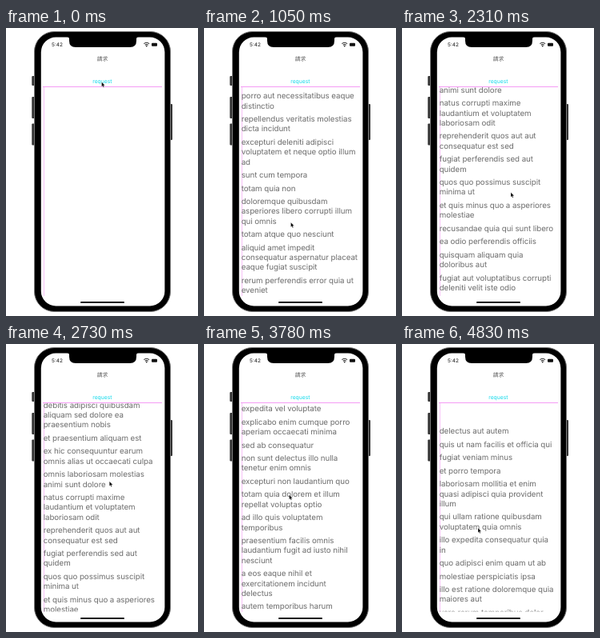
Recreate the animation shown at these times as an HTML page. Size 240x360 px, loop 5040 ms.

```html
<!DOCTYPE html>
<html lang="en">
<head>
<meta charset="utf-8">
<title>Request list</title>
<style>
html, body { margin: 0; width: 100%; height: 100%; overflow: hidden; background: #fff; }
svg { display: block; width: 100vw; height: 100vh; }
text { font-family: Inter, "Liberation Sans", sans-serif; text-rendering: geometricPrecision; white-space: pre; }
#list text { font-size: 9.75px; letter-spacing: -.06px; fill: #6c6c6c; }
</style>
</head>
<body>
<svg viewBox="0 0 240 360">
  <defs>
    <clipPath id="window"><rect x="44" y="74" width="154" height="260.5"/></clipPath>
  </defs>
  <g fill="#333">
    <rect x="32.3" y="60" width="4" height="12" rx="1"/>
    <rect x="32.3" y="86" width="4" height="27" rx="1"/>
    <rect x="32.3" y="119.5" width="4" height="27" rx="1"/>
    <rect x="204" y="95" width="4" height="45" rx="1"/>
  </g>
  <rect x="35.5" y="4.5" width="170" height="350" rx="25" stroke="#777"/>
  <rect x="43.8" y="11.5" width="154.6" height="336" rx="18.5" fill="#fff"/>
  <path d="M76 11H166Q163 11 163 14V16Q163 24 155 24H87Q79 24 79 16V14Q79 11 76 11Z"/>
  <text x="57" y="23" font-size="6.4" font-weight="500" fill="#333">5:42</text>
  <g fill="none" stroke="#222" stroke-width="1.1">
    <path d="M172.4 19.6Q175.7 16.8 179 19.6M173.8 21.3Q175.7 19.8 177.6 21.3"/>
    <circle cx="175.7" cy="22.6" r=".4"/>
  </g>
  <rect x="182" y="18.8" width="7" height="4" rx="1" fill="#111"/>
  <text x="120.5" y="41" font-size="6.8" text-anchor="middle" fill="#555" style="font-family:'Noto Sans CJK TC','Noto Sans CJK JP','Noto Sans CJK',sans-serif">請求</text>
  <text x="120.4" y="69" font-size="6.8" text-anchor="middle" fill="#10d8ea">request</text>
  <path d="M47.5 74V335" stroke="#f8c4f8"/>
  <g clip-path="url(#window)"><g id="list"></g></g>
  <path d="M46 73.5H195" stroke="#f59cf5"/>
  <rect x="93" y="342" width="55" height="1.8" rx=".9"/>
  <path id="cursor" d="M0 0V5.8L1.3 4.7 2.2 6.7 3.2 6.3 2.3 4.3H4.2Z" stroke="#fff" stroke-width=".3"/>
</svg>
<script>
const TITLES = `delectus aut autem
quis ut nam facilis et officia qui
fugiat veniam minus
et porro tempora
laboriosam mollitia et enim quasi adipisci quia provident illum
qui ullam ratione quibusdam voluptatem quia omnis
illo expedita consequatur quia/in
quo adipisci enim quam ut ab
molestiae perspiciatis ipsa
illo est ratione doloremque quia maiores aut
vero rerum temporibus dolor
ipsa repellendus fugit nisi
et doloremque nulla
repellendus sunt dolores architecto voluptatum
ab voluptatum amet voluptas
accusamus eos facilis sint et aut voluptatem
quo laboriosam deleniti aut qui
dolorum est consequatur ea mollitia in culpa
molestiae ipsa aut voluptatibus pariatur dolor nihil
ullam nobis libero sapiente ad optio sint
suscipit repellat esse quibusdam voluptatem incidunt
distinctio vitae autem nihil ut molestias quo
et itaque necessitatibus maxime molestiae qui quas velit
adipisci non ad dicta qui amet quaerat doloribus ea
voluptas quo tenetur perspiciatis explicabo natus
aliquam aut quasi
veritatis pariatur delectus
nesciunt totam sit blanditiis sit
laborum aut in quam
nemo perspiciatis repellat ut dolor libero commodi blanditiis omnis
repudiandae totam in est sint facere fuga
earum doloribus ea doloremque quis
sint sit aut vero
porro aut necessitatibus eaque distinctio
repellendus veritatis molestias dicta incidunt
excepturi deleniti adipisci voluptatem et neque optio illum ad
sunt cum tempora
totam quia non
doloremque quibusdam asperiores libero corrupti illum qui omnis
totam atque quo nesciunt
aliquid amet impedit consequatur aspernatur placeat eaque fugiat suscipit
rerum perferendis error quia ut eveniet
tempore ut sint quis recusandae
cum debitis quis accusamus doloremque ipsa natus sapiente omnis
velit soluta adipisci molestias reiciendis harum
vel voluptatem repellat nihil placeat corporis
nam qui rerum fugiat accusamus
sit reprehenderit omnis quia
ut necessitatibus aut maiores debitis officia blanditiis velit et
cupiditate necessitatibus ullam aut quis dolor voluptate
distinctio exercitationem ab doloribus
nesciunt dolorum quis recusandae ad pariatur ratione
qui labore est occaecati recusandae aliquid quam
quis et est ut voluptate quam dolor
voluptatum omnis minima qui occaecati provident nulla voluptatem ratione
deleniti ea temporibus enim
pariatur et magnam ea doloribus similique voluptatem rerum quia
est dicta totam qui explicabo doloribus qui dignissimos
perspiciatis velit id laborum placeat iusto et aliquam odio
et sequi qui architecto ut adipisci
odit optio omnis qui sunt
et placeat et tempore aspernatur sint numquam
doloremque aut dolores quidem fuga qui nulla
voluptas consequatur qui ut quia magnam nemo esse
fugiat pariatur ratione ut asperiores necessitatibus magni
rerum eum molestias autem voluptatum sit optio
quia voluptatibus voluptatem quos similique maiores repellat
aut id perspiciatis voluptatem iusto
doloribus sint dolorum ab adipisci itaque dignissimos aliquam suscipit
ut sequi accusantium et mollitia delectus sunt
aut velit saepe ullam
praesentium facilis facere quis harum voluptatibus voluptatem eum
sint amet quia totam corporis qui exercitationem commodi
expedita tempore nobis eveniet laborum maiores
occaecati adipisci est possimus totam
sequi dolorem sed
maiores aut nesciunt delectus exercitationem vel assumenda eligendi at
reiciendis est magnam amet nemo iste recusandae impedit quaerat
eum ipsa maxime ut
tempore molestias dolores rerum sequi voluptates ipsum consequatur
suscipit qui totam
voluptates eum voluptas et dicta
quidem at rerum quis ex aut sit quam
sunt veritatis ut voluptate
et quia ad iste a
incidunt ut saepe autem
laudantium quae eligendi consequatur quia et vero autem
vitae aut excepturi laboriosam sint aliquam et et accusantium
sequi ut omnis et
molestiae nisi accusantium tenetur dolorem et
nulla quis consequatur saepe qui id expedita
in omnis laboriosam
odio iure consequatur molestiae quibusdam necessitatibus quia sint
facilis modi saepe mollitia
vel nihil et molestiae iusto assumenda nemo quo ut
nobis suscipit ducimus enim asperiores voluptas
dolorum laboriosam eos qui iure aliquam
debitis accusantium ut quo facilis nihil quis sapiente necessitatibus
neque voluptates ratione
excepturi a et neque qui/expedita vel voluptate
explicabo enim cumque porro aperiam occaecati minima
sed ab consequatur
non sunt delectus illo nulla tenetur enim omnis
excepturi non laudantium quo
totam quia dolorem et illum repellat voluptas optio
ad illo quis voluptatem temporibus
praesentium facilis omnis laudantium fugit ad iusto nihil nesciunt
a eos eaque nihil et exercitationem incidunt delectus
autem temporibus harum quisquam in culpa
aut aut ea corporis
magni accusantium labore et id quis provident
consectetur impedit quisquam qui deserunt non rerum consequuntur eius
quia atque aliquam sunt impedit voluptatum rerum assumenda nisi
cupiditate quos possimus corporis quisquam exercitationem beatae
sed et ea eum
ipsa dolores vel facilis ut
sequi quae est et qui qui eveniet asperiores
quia modi consequatur vero fugiat
corporis ducimus ea perspiciatis iste
dolorem laboriosam vel voluptas et aliquam quasi
inventore aut nihil minima laudantium hic qui omnis
provident aut nobis culpa
esse et quis iste est earum aut impedit
qui consectetur id
aut quasi autem iste tempore illum possimus
ut asperiores perspiciatis veniam ipsum rerum saepe
voluptatem libero consectetur rerum ut
eius omnis est qui voluptatem autem
rerum culpa quis harum
nulla aliquid eveniet harum laborum libero alias ut unde
qui ea incidunt quis
qui molestiae voluptatibus velit iure harum quisquam
et labore eos enim rerum consequatur sunt
molestiae doloribus et laborum quod ea
facere ipsa nam eum voluptates reiciendis vero qui
asperiores illo tempora fuga sed ut quasi adipisci
qui sit non
placeat minima consequatur rem qui ut
consequatur doloribus id possimus voluptas a voluptatem
aut consectetur in blanditiis deserunt quia sed laboriosam
explicabo consectetur debitis voluptates quas quae culpa rerum non
maiores accusantium architecto necessitatibus reiciendis ea aut
eum non recusandae cupiditate animi
ut eum exercitationem sint
beatae qui ullam incidunt voluptatem non nisi aliquam
molestiae suscipit ratione nihil odio libero impedit vero totam
eum itaque quod reprehenderit et facilis dolor autem ut
esse quas et quo quasi exercitationem
animi voluptas quod perferendis est
eos amet tempore laudantium fugit a
accusamus adipisci dicta qui quo ea explicabo sed vero
odit eligendi recusandae doloremque cumque non
ea aperiam consequatur qui repellat eos
rerum non ex sapiente
voluptatem nobis consequatur et assumenda magnam
nam quia quia nulla repellat assumenda quibusdam sit/nobis
dolorem veniam quisquam deserunt repellendus
debitis vitae delectus et harum accusamus aut deleniti a
debitis adipisci quibusdam aliquam sed dolore ea praesentium nobis
et praesentium aliquam est
ex hic consequuntur earum omnis alias ut occaecati culpa
omnis laboriosam molestias animi sunt dolore
natus corrupti maxime laudantium et voluptatem laboriosam odit
reprehenderit quos aut aut consequatur est sed
fugiat perferendis sed aut quidem
quos quo possimus suscipit minima ut
et quis minus quo a asperiores molestiae
recusandae quia qui sunt libero
ea odio perferendis officiis
quisquam aliquam quia doloribus aut
fugiat aut voluptatibus corrupti deleniti velit iste odio
et provident amet rerum consectetur et voluptatum
harum ad aperiam quis
similique aut quo
laudantium eius officia perferendis provident perspiciatis asperiores
magni soluta corrupti ut maiores rem quidem
et placeat temporibus voluptas est tempora quos quibusdam
nesciunt itaque commodi tempore
omnis consequuntur cupiditate impedit itaque ipsam quo
debitis nisi et dolorem repellat et
ut cupiditate sequi aliquam fuga maiores
inventore saepe cumque et aut illum enim
omnis nulla eum aliquam distinctio
molestias modi perferendis perspiciatis`.split("\n");

const LOOP = 5040, STEP = 210, LINE = 12.33, GAP = 4.17;
const list = document.getElementById("list");
const cursor = document.getElementById("cursor");

function addText(content, y) {
  const node = document.createElementNS("http://www.w3.org/2000/svg", "text");
  node.setAttribute("x", 46.7);
  node.setAttribute("y", y);
  node.textContent = content;
  return list.appendChild(node);
}

const ruler = addText("", 0);
function widthOf(content) {
  ruler.textContent = content;
  return ruler.getComputedTextLength();
}

// The widest line that still fits sets the column width.
const maxWidth = widthOf("consequatur aspernatur placeat") + 0.2;

// A slash in a title forces a line break.
function wrap(title) {
  const lines = [];
  for (const part of title.split("/")) {
    let line = "";
    for (const word of part.split(" ")) {
      const longer = line ? line + " " + word : word;
      if (line && widthOf(longer) > maxWidth) {
        lines.push(line);
        line = word;
      } else line = longer;
    }
    lines.push(line);
  }
  return lines;
}

const rowTops = [];
let bottom = 0;
for (const lines of TITLES.map(wrap)) {
  rowTops.push(bottom);
  lines.forEach((line, i) => addText(line, bottom + i * LINE + 3.3));
  bottom += lines.length * LINE + GAP;
}
ruler.remove();

// Step, row number, height of that row's first line on the stage
const scrollKeys = [
  [1, 1, 82], [2, 1, 50], [5, 34, 85], [8, 171, 84], [9, 171, 32], [10, 171, 196],
  [11, 163, 94], [15, 163, 289.5], [18, 101, 97.5], [22, 1, 40], [23, 1, 109]
].map(([step, row, y]) => [step, y - rowTops[row - 1]]);

// Step, x, y of the pointer tip
const cursorKeys = [
  [0, 119.5, 67.5], [5, 108.5, 243], [8, 140.5, 155.5], [11, 136, 205.5],
  [15, 122.5, 138], [18, 106.5, 188.5], [23, 95, 230]
];

function sample(keys, step) {
  if (step <= keys[0][0]) return keys[0].slice(1);
  const i = keys.findIndex(key => key[0] >= step);
  const [a, b] = [keys[i - 1], keys[i]];
  const k = (step - a[0]) / (b[0] - a[0]);
  return a.slice(1).map((value, j) => value + (b[j + 1] - value) * k);
}

function draw(time) {
  const step = Math.floor((time % LOOP) / STEP);
  list.style.display = step ? "" : "none";
  list.setAttribute("transform", `translate(0 ${sample(scrollKeys, step)[0]})`);
  cursor.setAttribute("transform", `translate(${sample(cursorKeys, step)})`);
}

const start = performance.now();
function tick() {
  draw(performance.now() - start);
  requestAnimationFrame(tick);
}
tick();
</script>
</body>
</html>
```
